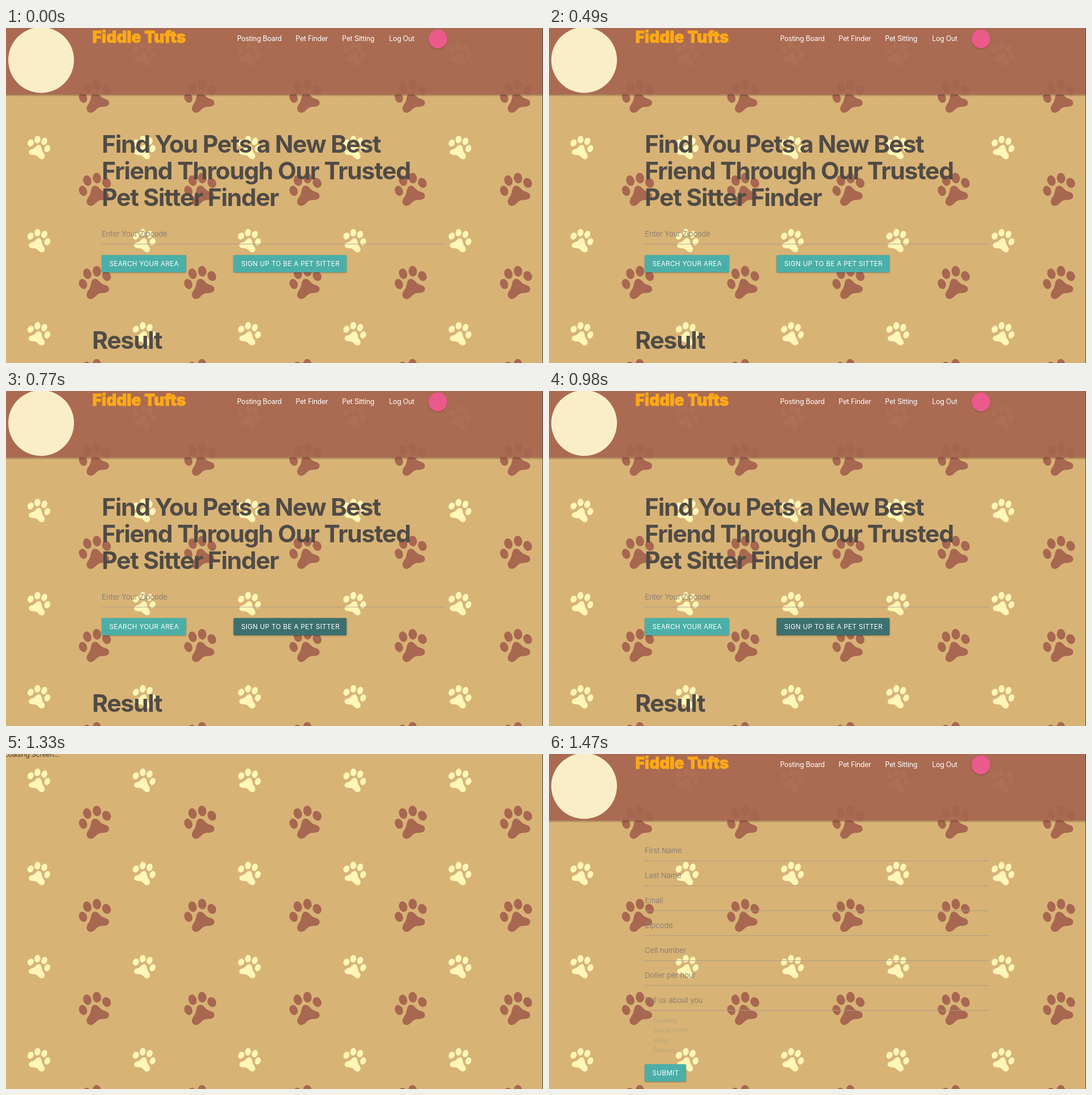
An HTML page for the animation above (1.54 s loop, 948 by 591 pixels).

```html
<!DOCTYPE html>
<html lang="en">
<head>
<meta charset="utf-8">
<title>Pet sitter finder</title>
<style>
  html, body { margin: 0; width: 100%; height: 100%; overflow: hidden; background: #d8b376; }
  svg { display: block; width: 948px; height: 591px; font-family: Inter, sans-serif; }
  .brand { font-size: 28px; font-weight: 900; fill: #fba919; stroke: #fba919; stroke-width: .8; }
  .link { font-size: 12.4px; letter-spacing: -.25px; fill: #fff; }
  .title { font-size: 42.7px; font-weight: 700; letter-spacing: -1.3px; fill: #504b46; }
  .label { font-size: 13.3px; letter-spacing: -.25px; fill: #8c8172; }
  .option { font-size: 9.7px; fill: #bca57b; }
  .caption { font-size: 11.67px; letter-spacing: .35px; fill: #fff; }
  .loading { font-size: 12.2px; letter-spacing: -.2px; fill: #4a4034; }
  .button { fill: #4bafa8; filter: drop-shadow(.3px 1.2px 1px #0005); }
  .avatar { fill: #ea5a8a; filter: drop-shadow(0 1px 1px #0004); }
  .rule { stroke: #a69c8a; stroke-width: .9; }
</style>
</head>
<body>
<svg viewBox="0 0 948 591">
  <defs>
    <g id="paw">
      <ellipse rx="7" ry="9.2" transform="translate(-21 2) rotate(-22)"/>
      <ellipse rx="7.2" ry="9.4" transform="translate(-13.5 -16) rotate(-18)"/>
      <ellipse rx="7.4" ry="9.4" transform="translate(3.5 -20.5) rotate(-8)"/>
      <ellipse rx="7.4" ry="9" transform="translate(20.5 -12) rotate(-28)"/>
      <path d="M0-7C6-7 8-1 13 2C18 4 25 5 25 11C25 17 19 18 13 18C6 18 3 22 0 25C-4 29-9 30-13 26C-17 21-13 15-10 11C-6 5-8-7 0-7Z"/>
    </g>
    <linearGradient id="shade" x2="0" y2="1">
      <stop stop-color="#000" stop-opacity=".3"/>
      <stop offset="1" stop-color="#000" stop-opacity="0"/>
    </linearGradient>
  </defs>
  <rect width="948" height="591" fill="#d8b376"/>
  <g id="paws"></g>
  <g id="header"></g>
  <g id="search"></g>
  <g id="form"></g>
  <g id="loading"></g>
  <path d="M947.5 0V591" stroke="#4e463a"/>
</svg>
<script>
const LOOP = 1540, PRESS = 665, LOADING = 1050, FORM = 1470;
const el = id => document.getElementById(id);
const text = (kind, x, y, words) => `<text class="${kind}" x="${x}" y="${y}">${words}</text>`;
const rule = y => `<path class="rule" d="M169 ${y}H776"/>`;
const button = (id, x, y, width, words) =>
  `<rect id="${id}" class="button" x="${x}" y="${y}" width="${width}" height="30.4" rx="1.7"/>` +
  text("caption", x + 13.5, y + 19.3, words);

let paws = "";
for (let row = 0; row < 4; row++) {
  for (let col = 0; col < 5; col++) {
    const x = col * 185.85, y = row * 164.3;
    paws += `<use href="#paw" fill="#fff6b8" transform="translate(${x + 58} ${y + 47}) scale(-.71 .71)"/>
      <use href="#paw" fill="#a86750" transform="translate(${x + 157} ${y + 121})"/>`;
  }
}
el("paws").innerHTML = paws;

el("header").innerHTML =
  `<rect y="117.5" width="948" height="3.5" fill="url(#shade)"/>
   <rect width="948" height="117.5" fill="#a66550" fill-opacity=".92"/>
   <circle cx="62" cy="56.5" r="58" fill="#faeec8"/>
   <circle class="avatar" cx="762.5" cy="19.3" r="16.7"/>` +
  text("brand", 152.5, 26, "Fiddle Tufts") +
  [[408, "Posting Board"], [511.3, "Pet Finder"], [593.3, "Pet Sitting"], [676.3, "Log Out"]]
    .map(([x, words]) => text("link", x, 23, words)).join("");

el("search").innerHTML =
  ["Find You Pets a New Best", "Friend Through Our Trusted", "Pet Sitter Finder"]
    .map((words, i) => text("title", 169, 219.5 + i * 47, words)).join("") +
  text("label", 169, 368, "Enter Your Zipcode") + rule(381.2) +
  button("find", 169, 400.6, 149, "SEARCH YOUR AREA") +
  button("join", 401.7, 400.6, 199.6, "SIGN UP TO BE A PET SITTER") +
  text("title", 152, 565.5, "Result");

el("form").innerHTML =
  ["First Name", "Last Name", "Email", "Zipcode", "Cell number", "Doller per hour", "Tell us about you"]
    .map((words, i) => text("label", 169, 174.7 + i * 44.05, words) + rule(188.5 + i * 44)).join("") +
  ["Boarding", "Stay at Home", "Walks", "Daycare"]
    .map((words, i) => text("option", 184.5, 473.5 + i * 17.6, words)).join("") +
  button("submit", 169, 547.3, 73, "SUBMIT");

el("loading").innerHTML = text("loading", -3, 5, "Loading Screen...");

const show = (id, visible) => el(id).style.display = visible ? "" : "none";
const mix = (a, b, k) => a + (b - a) * k;

function draw(now) {
  const t = now % LOOP;
  const waiting = t >= LOADING && t < FORM;
  show("header", !waiting);
  show("search", t < LOADING);
  show("loading", waiting);
  show("form", t >= FORM);
  const k = Math.min(1, Math.max(0, (t - PRESS) / 70));
  el("join").style.fill = `rgb(${mix(75, 60, k)}, ${mix(175, 112, k)}, ${mix(168, 111, k)})`;
  requestAnimationFrame(draw);
}
draw(0);
</script>
</body>
</html>
```
